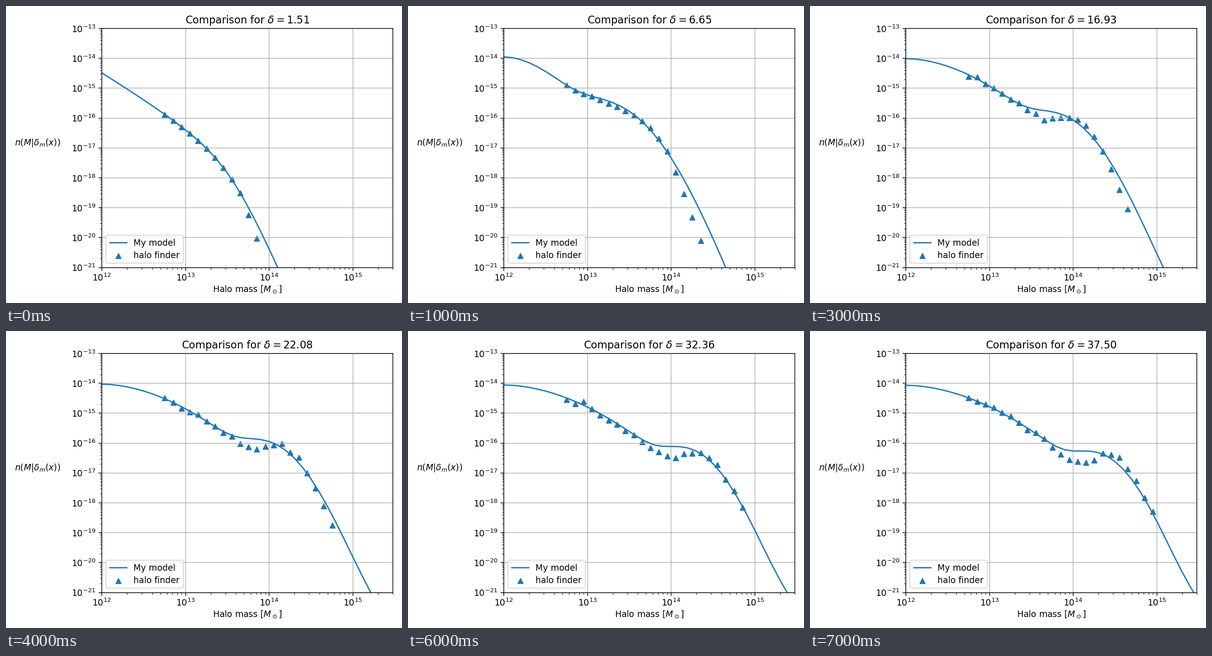
Write a matplotlib script that moves like this. It is 864 by 648 pixels and loops after 8 s.

```python
import numpy as np
import matplotlib.pyplot as plt
from matplotlib.animation import FuncAnimation

W, H, DPI = 864, 648, 135
STEPS = 8
DELTAS = np.linspace(1.51, 37.5, STEPS)
TOP, DEPTH = -13, 8                         # y axis: log10 top, decades shown
FIRST = 0.753                               # first halo bin, dex above 1e12


def growth(delta):
    return np.log(delta / 1.5)


def knee(delta):
    """Mass where the high-mass branch turns over, dex above 1e12."""
    return 1.55 + 0.089 * growth(delta) ** 2


def end(delta):
    """Mass where the model leaves the plot."""
    return np.polyval([-0.012, 0.0674, 0.297, 2.1], growth(delta))


def low_branch(x, delta):
    start = 0.808 + 0.071 * np.log(delta) + 20 / delta ** 4
    steep = 0.6 + 3.5 / delta + 33 / delta ** 2
    return start + steep * x ** 1.85


def high_branch(x, delta):
    """Hyperbola around the knee that reaches the bottom at end()."""
    g = growth(delta)
    tilt = 1.95 + 2.225 * np.exp(-0.2417 * g ** 2.5)
    bend = 2.5 + 1.72 * g
    width = 1 - 1.25 / delta ** 2

    def shape(m):
        t = m - knee(delta)
        return tilt * t + bend * np.hypot(t, width)

    return DEPTH + shape(x) - shape(end(delta))


def model(x, delta):
    """Depth in decades below the top of the plot."""
    return -np.log10(10 ** -low_branch(x, delta)
                     + 10 ** -high_branch(x, delta))


def bell(t, centre, width):
    return np.exp(-0.5 * ((t - centre) / width) ** 2)


def scatter_off(x, delta, seed):
    """How far the halo counts fall below the model."""
    g = growth(delta)
    t = x - knee(delta)
    dip = 0.04 * g ** 2 * bell(t, -0.38, 0.18)
    hump = 0.055 * g * bell(t, 0.05, 0.15)
    tail = 2.4 * np.maximum(0, t - 0.1 - 0.06 * g) * (1 - (g / 3.22) ** 4)
    noise = np.random.default_rng(seed).normal(0, 0.005 * g ** 2, len(x))
    return dip - hump + tail + noise


def curve(k):
    x = np.arange(0, end(DELTAS[k]) + 0.2, 0.1)
    return x, model(x, DELTAS[k])


def halos(k):
    delta = DELTAS[k]
    margin = 0.405 - 0.24 * np.exp(-0.33 * growth(delta) ** 2)
    x = np.arange(FIRST, end(delta) - margin, 0.1)
    return x, model(x, delta) + scatter_off(x, delta, k)


def to_data(x, depth):
    return 10 ** (12 + x), 10 ** (TOP - depth)


fig, ax = plt.subplots(figsize=(W / DPI, H / DPI), dpi=DPI)
fig.subplots_adjust(left=209 / W, right=843.75 / W,
                    bottom=1 - 570.5 / H, top=1 - 49 / H)

line, = ax.plot(*to_data(*curve(0)), color="C0", label="My model")
dots = ax.scatter(*to_data(*halos(0)), marker="^", color="C0",
                  label="halo finder")
ax.set_xscale("log")
ax.set_yscale("log")
ax.set_xlim(1e12, 3e15)
ax.set_ylim(10.0 ** (TOP - DEPTH), 10.0 ** TOP)
ax.grid(True)
ax.tick_params(axis="x", pad=3)
ax.set_xlabel(r"Halo mass [$M_\odot$]", labelpad=1.8)
ax.set_ylabel(r"$n(M|\delta_m(x))$", rotation=0, labelpad=39.5)
ax.legend(loc="lower left", labelspacing=0.43)
title = ax.set_title("")


def update(k):
    line.set_data(*to_data(*curve(k)))
    dots.set_offsets(np.column_stack(to_data(*halos(k))))
    title.set_text(rf"Comparison for $\delta = {DELTAS[k]:.2f}$")
    return line, dots, title


anim = FuncAnimation(fig, update, frames=STEPS, interval=1000,
                     repeat=True, repeat_delay=0, blit=False)
plt.show()
```
